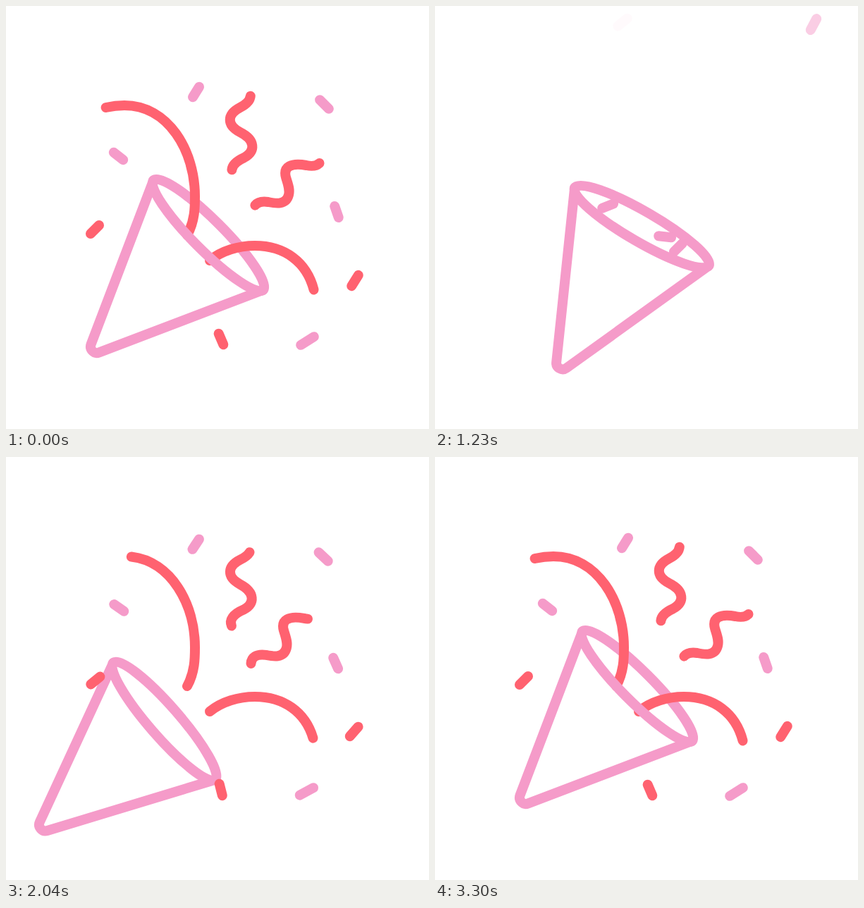
These frames come from a looping animation (600 px wide and 600 px high, 5.33 s). An HTML page:

```html
<!DOCTYPE html>
<html lang="en">
<head>
<meta charset="utf-8">
<title>Party popper</title>
<style>
  html, body { margin: 0; width: 100%; height: 100%; overflow: hidden; background: #fff; }
  svg { display: block; width: 100%; height: 100%; }
  path { fill: none; stroke-width: 14; stroke-linecap: round; stroke-linejoin: round; }
  .pink { stroke: #f59bc9; }
  .red { stroke: #ff6270; }
</style>
</head>
<body>
<svg viewBox="0 0 600 600"></svg>
<script>
const LOOP = 5330, STEP = 30, END = 3300, POP = 1200;
const svg = document.querySelector('svg');

function addPath(color, d = '') {
  const p = document.createElementNS('http://www.w3.org/2000/svg', 'path');
  p.setAttribute('class', color);
  p.setAttribute('d', d);
  return svg.appendChild(p);
}
const set = (el, attrs) => { for (const k in attrs) el.setAttribute(k, attrs[k]); };
const lerp = (a, b, k) => a + (b - a) * k;
const span = (t, a, b) => Math.min(1, Math.max(0, (t - a) / (b - a)));
const smooth = s => s * s * (3 - 2 * s);
const out = s => 1 - (1 - s) ** 3;

// Cubic bezier easing (.33, 0, .5, 1)
function settle(x) {
  let lo = 0, hi = 1;
  for (let i = 0; i < 24; i++) {
    const u = (lo + hi) / 2, v = 1 - u;
    if (.99 * v * v * u + 1.5 * v * u * u + u ** 3 < x) lo = u; else hi = u;
  }
  return smooth(lo);
}

// Each streamer runs from the cone outwards; rest is its trim range,
// grow and leave are times, shift is its [x, y, turn] when it emerges.
const streamers = [
  { d: 'M257 325C268 305 268 285 268 270C268 205 230 141 168 141C140 141 130 150 104 150C78 150 50 137 44 114',
    rest: [0, .7], grow: 2870, leave: [0, 1080], shift: [0, 0, 0] },
  { d: 'M289 361C306 347 330 340 353 340C405 340 440 375 440 431C440 470 425 505 398 512',
    rest: [0, .59], grow: 2340, leave: [0, 900], shift: [0, 0, 0] },
  { d: 'M327 245C316 236 318 224 338 215C354 206 354 190 332 179C313 169 313 154 332 144C342 139 355 128 340 114',
    rest: [.085, .91], grow: 2440, leave: [330, 1140], shift: [5, 29, 33] },
  { d: 'M353 301C347 288 352 275 372 278C382 280 397 283 401 268C403 260 400 253 397 243C393 228 404 222 426 226C440 229 449 224 449 210',
    rest: [.11, .92], grow: 2670, leave: [330, 1140], shift: [-35, 32, 0] }
];

// from / rest / to: [x, y, angle]; mid is the angle at 570 ms
const confetti = [
  { color: 'pink', len: 17, from: [243, 298, -22], rest: [269.5, 122, -58], mid: -31, to: [266, 23, -39], fade: [960, 1245] },
  { color: 'pink', len: 18, from: [315, 344, 6], rest: [451.5, 139.5, 45], mid: 27, to: [537, 26, -62], fade: [1110, 1350] },
  { color: 'pink', len: 17, from: [241, 307, -40], rest: [159.5, 213, 38], mid: 107, to: [42, 81, 150], fade: [720, 1080] },
  { color: 'red', len: 17, from: [209, 317, 82], rest: [126, 317, -45], mid: -71, to: [-10, 452, -90], fade: [450, 690] },
  { color: 'pink', len: 17, from: [334, 347, -45], rest: [469, 292, 71], mid: 0, to: [587, 205, -50], fade: [720, 1080] },
  { color: 'red', len: 18, from: [363, 381, 153], rest: [495, 389.5, -58], mid: 8, to: [603, 378, 50], fade: [690, 1020] },
  { color: 'red', len: 17, from: [280, 411, 272], rest: [305, 472.5, 67], mid: 130, to: [359, 588, 170], fade: [690, 1020] },
  { color: 'pink', len: 22, from: [316, 413, 53], rest: [427.5, 475, -32], mid: 36, to: [547, 542, 80], fade: [720, 1080] }
];
const early = [0, 1, 4];

const rimBack = addPath('pink');
for (const s of streamers) {
  s.el = addPath('red', s.d);
  set(s.el, { pathLength: 1 });
}
const rimFront = addPath('pink');
for (const c of confetti) {
  const d = `M${-c.len / 2} 0H${c.len / 2}`;
  c.leaving = addPath(c.color, d);
  c.coming = addPath(c.color, d);
}

function conePose(t) {
  const angle = t < POP ? lerp(45, 30, smooth(span(t, 0, POP)))
    : t < 1800 ? lerp(30, 49.3, smooth(span(t, POP, 1800)))
    : lerp(49.3, 45, settle(span(t, 1800, END)));
  if (t < POP) {
    const k = smooth(span(t, 0, POP));
    const bow = (a, b, c) => lerp(lerp(a, b, k), lerp(b, c, k), k);
    return [bow(287, 300.6, 294.5), bow(325, 313.7, 312), angle];
  }
  const back = smooth(span(t, POP, 1620)), home = settle(span(t, 1640, END));
  return [lerp(lerp(294.5, 211, back), 287, home), lerp(lerp(312, 385.5, back), 325, home), angle];
}

function drawCone(t) {
  const [x, y, angle] = conePose(t);
  const transform = `translate(${x} ${y}) rotate(${angle})`;
  set(rimBack, { transform, d: 'M-110 0A110 21.5 0 0 1 110 0' });
  set(rimFront, { transform,
    d: 'M-110 0A110 21.5 0 0 0 110 0L8.2 227.1A9 9 0 0 1 -8.2 227.1Z' });
}

function drawStreamer(s, t) {
  let [a, b] = s.rest, left = 0;
  if (t < POP) {
    a = lerp(a, 1, smooth(span(t, ...s.leave)));
    b = lerp(b, 1, smooth(span(t, 0, 540)));
  } else {
    const k = out(span(t, 1260, s.grow));
    left = 1 - k;
    b *= k;
    a *= smooth(span(t, 1740, 2280));
  }
  const [dx, dy, turn] = s.shift;
  set(s.el, {
    visibility: b - a > .001 ? 'visible' : 'hidden',
    'stroke-dasharray': `${Math.max(0, b - a)} 3`,
    'stroke-dashoffset': -a,
    transform: `translate(${dx * left} ${dy * left}) rotate(${turn * left} 318 161)`
  });
}

function place(el, p, q, k, angle, opacity) {
  set(el, { opacity, transform: `translate(${lerp(p[0], q[0], k)} ${lerp(p[1], q[1], k)}) rotate(${angle})` });
}

function drawConfetti(c, i, t) {
  const turn = t < 570 ? lerp(c.rest[2], c.mid, t / 570) : lerp(c.mid, c.to[2], span(t, 570, 1230));
  place(c.leaving, c.rest, c.to, out(span(t, 0, 1350)), turn, 1 - span(t, ...c.fade));
  const spin = lerp(c.from[2], c.rest[2], smooth(span(t, POP, 2160)));
  const shown = t > (early.includes(i) ? POP : 1290) ? 1 : 0;
  place(c.coming, c.from, c.rest, out(span(t, POP, 2270)), spin, shown);
}

function frame(now) {
  const t = Math.min(END, Math.floor(now % LOOP / STEP) * STEP);
  drawCone(t);
  streamers.forEach(s => drawStreamer(s, t));
  confetti.forEach((c, i) => drawConfetti(c, i, t));
}

let start;
function tick(now) {
  start ??= now;
  frame(now - start);
  requestAnimationFrame(tick);
}
frame(0);
requestAnimationFrame(tick);
</script>
</body>
</html>
```
